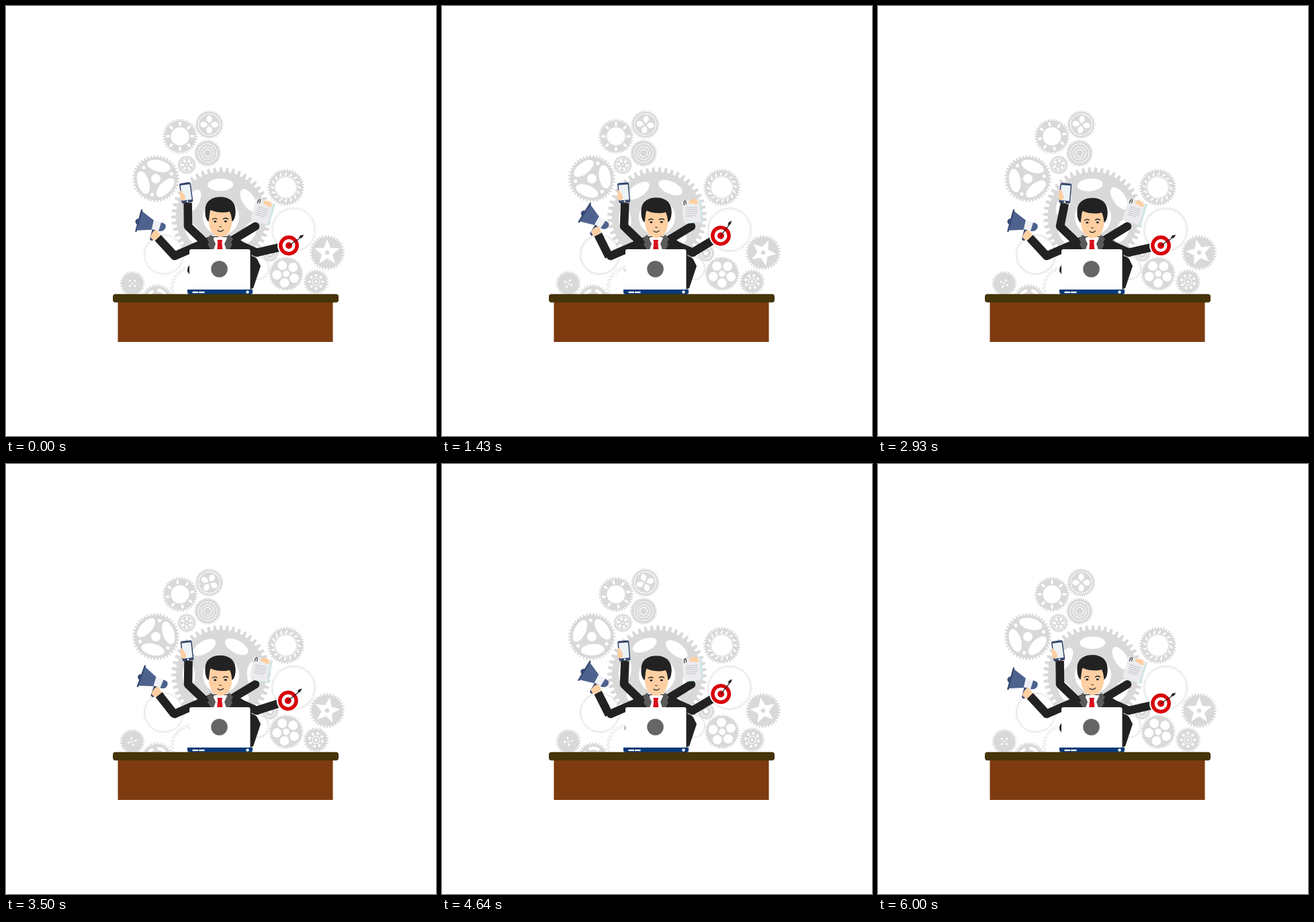
These frames come from a looping animation (640 px wide and 640 px high, 6070 ms). An HTML page:

```html
<!DOCTYPE html>
<html lang="en">
<head>
<meta charset="utf-8">
<title>Busy desk</title>
<style>
html, body { margin: 0; width: 100%; height: 100%; overflow: hidden; background: #fff; }
svg { display: block; width: 100%; height: 100%; }
.skin { fill: #fdcfa2; }
.suit { fill: #222; }
.sleeve { fill: none; stroke: #222; stroke-width: 12.5; }
.upper { stroke-linecap: round; }
.fine { fill: none; stroke: #222; stroke-linecap: round; }
</style>
</head>
<body>
<svg viewBox="0 0 640 640">
  <g id="gears"></g>

  <g id="typing"><path class="suit" d="M286 372 L276 382 Q269 389 270 395 L274 401 L290 400Z"/></g>
  <path class="suit" d="M283 356 Q290 348 303 343 L335 343 Q347 346 354 352 L366 372 Q371 373 374 377 L379 387 L368 420 L363 422 H280Z"/>

  <path class="sleeve upper" d="M290 355 L251 372"/>
  <path class="sleeve upper" d="M297 353 L271 328"/>
  <path class="sleeve upper" d="M338 348 L371 328"/>
  <path class="sleeve upper" d="M346 355 L373 367"/>

  <g id="horn">
    <path class="sleeve" d="M251 372 L226 345"/>
    <path fill="#34466c" d="M218 331 L224 333 L219 348 Q217 351 214 347Z"/>
    <circle cx="197" cy="321" r="4.5" fill="#384b74"/>
    <path fill="#4d628d" d="M202 305 L220 319 L217 333 L195 334Z"/>
    <path fill="#eef0f6" d="M220 319 L231 322 L227 335 L217 332Z"/>
    <path fill="#4d628d" d="M231 322 L236 324 Q239 327 237 331 Q235 336 227 335Z"/>
    <path d="M202 304 L193.5 335" stroke="#384b74" stroke-width="2.6" stroke-linecap="round"/>
    <path class="skin" d="M217 339 Q221 332 225 334 L230 341 L222 349 Q215 347 215 343Z"/>
  </g>

  <g id="phone">
    <path class="sleeve" d="M271 328 L270.5 293"/>
    <path class="skin" d="M264 286 L274 286 L276 293 L265 293Z"/>
    <g transform="translate(268 278) rotate(-8)">
      <rect x="-8.5" y="-15" width="17" height="30" rx="2.5" fill="#34466c"/>
      <rect x="-7" y="-12" width="14" height="23" fill="#edf2f5"/>
      <circle cy="13" r="1.3" fill="#fff"/>
      <path class="skin" d="M-9 -4 Q-6 -6 -5 -1 L-2 5 Q-2 12 -7 11 L-10 8Z"/>
    </g>
  </g>

  <g id="paper">
    <g transform="translate(382 306) rotate(17)">
      <path fill="#cfe5e3" d="M-10 -16 H15 V18 H-11Z"/>
      <path fill="#ececee" d="M-14 -16 H12 V17 H-11 L-14 14Z"/>
      <path d="M-9 -5 H8 M-9 -2 H8 M-9 1 H8 M-9 4 H8 M-9 7 H5" stroke="#c2c5c9"/>
      <path class="fine" stroke-width="1.1" d="M-11 -10 V-14 Q-9 -18 -8 -14 V-11"/>
      <path class="skin" d="M-4 -14 Q0 -19 8 -17 L11 -11 Q6 -8 3 -11 L-3 -12Z"/>
    </g>
  </g>

  <g id="target">
    <path class="sleeve" d="M373 367 L406 359.5"/>
    <circle cx="421" cy="356.5" r="17" fill="#fff"/>
    <circle cx="421" cy="356.5" r="14.9" fill="#d90008"/>
    <circle cx="421" cy="356.5" r="9.5" fill="#fff"/>
    <circle cx="421" cy="356.5" r="5" fill="#d90008"/>
    <path class="fine" stroke-width="1.2" d="M421 356.5 L439 344.5"/>
    <path class="suit" d="M436 345 L438 341.5 L443.5 340.5 L440.5 345Z"/>
  </g>

  <path fill="#fff" d="M309 344 L329 344 L331 364 H306Z"/>
  <path fill="#d90f1c" d="M314.5 348 H322 L321.3 352 L322.5 364 H314 L315.2 352Z"/>
  <path fill="#5a5a5a" d="M304 341 L299 347 L302 352 L300 355 L306 364 L309 363 L312 354 L306 341Z M333 341 L338 347 L335 352 L337 355 L332 364 L328 363 L325 354 L331 341Z"/>

  <g id="head">
    <path class="skin" d="M301.5 313 C301 334 309 344 319.3 344 C330 344 337.5 333 336.5 313 L333 302 H305Z"/>
    <path class="suit" d="M301.5 321 C297.5 318 296 311 296.5 303 C297 290 307 284.3 319 284.3 C333 284.3 342 292 341.7 306 C341.5 313 340 319 336.3 321 C336 315 335 310 333 306 C325 308.5 313 307.5 304.5 303.5 C302.5 309 303 314 301.5 321Z"/>
    <path class="fine" stroke-width="1.4" d="M307.5 317.5 Q310.5 315 314 317 M323.5 317 Q327 314.5 330.5 317"/>
    <ellipse class="suit" cx="311.3" cy="320.8" rx="2" ry="1.5"/>
    <ellipse class="suit" cx="326.8" cy="320.6" rx="2" ry="1.5"/>
    <path class="fine" stroke-width="1" d="M317.5 328.5 Q319 329.8 320.5 328.5"/>
    <path class="fine" stroke-width="1.2" d="M315 334 Q319 337.5 323.5 333.5"/>
  </g>

  <rect x="273" y="362" width="90.5" height="61" rx="3" fill="#fff"/>
  <circle cx="317.5" cy="391.5" r="12.3" fill="#666"/>
  <path fill="#083a78" d="M270 422 H367 V426 Q367 429 364 429 H273 Q270 429 270 426Z"/>
  <path fill="#fff" d="M277.5 425 H286 V427.3 H277.5Z M287 425 H295.5 V427.3 H287Z"/>
  <circle cx="359.5" cy="425.8" r="2.2" fill="#fff"/>

  <rect x="166.5" y="440" width="320" height="60" fill="#7d3b0f"/>
  <rect x="159" y="428.7" width="336" height="12.5" rx="4" fill="#46340b"/>
</svg>
<script>
const LOOP = 6070, FPS = 14, LAST = 84;
const GREY = '#d9d9d9';
const byId = id => document.getElementById(id);

// Closed outline with n trapezoid teeth between radii r (root) and R (tip).
function teeth(n, R, r) {
  const pts = [];
  for (let i = 0; i < n; i++) {
    for (const [f, rad] of [[-.32, r], [-.17, R], [.17, R], [.32, r]]) {
      const a = (i + f) * 2 * Math.PI / n;
      pts.push((rad * Math.cos(a)).toFixed(2) + ' ' + (rad * Math.sin(a)).toFixed(2));
    }
  }
  return 'M' + pts.join('L') + 'Z';
}

// Repeat a part n times around the hub, starting at angle a.
const around = (n, a, part) => Array.from({ length: n },
  (_, i) => `<g transform="rotate(${a + i * 360 / n})">${part}</g>`).join('');
const hole = (x, rx, ry = rx) => `<ellipse cx="${x}" rx="${rx}" ry="${ry}"/>`;
const hub = r => `<circle r="${r}"/>`;
const slot = (x, len, w) => `<rect x="${x}" y="${-w / 2}" width="${len}" height="${w}" rx="1"/>`;
const ring = (r, w, dash = '') =>
  `<circle r="${r}" fill="none" stroke="#fff" stroke-width="${w}" stroke-dasharray="${dash}"/>`;

const star = 'M' + Array.from({ length: 10 }, (_, i) => {
  const a = (i * 36 - 90) * Math.PI / 180, r = i % 2 ? 8.5 : 20;
  return (r * Math.cos(a)).toFixed(1) + ' ' + (r * Math.sin(a)).toFixed(1);
}).join('L') + 'Z';

// x, y, tip radius, root radius, teeth, degrees per second, cut-outs (none = outline only)
const gears = [
  [428, 333, 33, 30.6, 48, -132, ''],
  [235, 370, 30, 27.8, 44, 144, ''],
  [278, 420, 33, 29, 32, -135, ''],
  [374, 390, 18, 16, 30, 240, ''],
  [320, 314, 74, 67, 48, 60, around(6, -91, hole(48, 9.3, 19)) + hub(27)],
  [223, 257, 35, 32, 42, -120, around(3, -77, hole(19.5, 8.5, 17.5)) + around(3, -17, hole(24.5, 2.6)) + hub(7)],
  [259, 194, 26, 23.3, 36, -157.5, around(8, -90, slot(15.5, 6, 3.4)) + hub(13.5)],
  [302.5, 176.5, 21, 18.8, 38, -120, ring(16, 1.2) + around(4, -90, hole(8.2, 5, 4.2) + slot(2, 4, 2))],
  [300, 219, 20, 17.8, 38, -225, ring(14, 1.5, '2.4 1.27') + ring(9.6, 1.6, '2 1.02') + ring(5.6, 1.1)],
  [269, 236.5, 14, 12.5, 30, 300, ring(10, 1) + around(6, 0, hole(6.2, 2.4, 2)) + hub(1.2)],
  [416.5, 270, 27.5, 24.8, 38, -160,
    around(16, 0, '<g transform="translate(20 0) rotate(35)">' + slot(-2.7, 5.4, 2.4) + '</g>') + hub(15.5) + ring(16.8, .6)],
  [393, 368, 13, 11, 22, -300, ring(8, 1.2) + hub(3)],
  [478, 367, 26, 23, 34, 168, `<path d="${star}"/><circle r="3.2" fill="${GREY}"/>`],
  [417, 398.5, 25.5, 23.3, 38, 144, around(5, -115, hole(13.9, 6.9)) + hub(4.8)],
  [461.5, 410.5, 18.5, 15.8, 26, -240, around(8, 0, hole(9.7, 2)) + ring(5.5, 1) + hub(1.8)],
  [188, 413, 18.5, 15.8, 28, 240, around(4, 45, hole(5.2, 1.8, 1.4)) + hub(1.3)],
  [225, 437, 23, 20, 30, -180, ring(14, 4.5, '15.6 6.4') + hub(5)]
];

byId('gears').innerHTML = gears.map(([x, y, R, r, n, , cuts]) => {
  const paint = cuts ? `fill="${GREY}"` : 'fill="#fff" stroke="#dedede" stroke-width=".9"';
  return `<g transform="translate(${x} ${y})"><g><path d="${teeth(n, R, r)}" ${paint}/><g fill="#fff">${cuts}</g></g></g>`;
}).join('');
const wheels = [...byId('gears').children].map(g => g.firstChild);

// Forearms: pivot x, y, swing in degrees, period and lag in seconds
const arms = {
  horn: [246, 364, 16.5, 3, -.03],
  phone: [270.5, 328, 13.5, 1.2, .04],
  paper: [375, 331, -22, 3, -.03],
  target: [373, 368, -18.5, 3, -.03]
};

// Smooth 0 -> 1 -> 0 over one period.
const wave = (s, period) => (1 - Math.cos(2 * Math.PI * s / period)) / 2;
const move = (el, value) => el.setAttribute('transform', value);

function draw(s) {
  wheels.forEach((w, i) => move(w, `rotate(${gears[i][5] * s})`));
  for (const id in arms) {
    const [x, y, deg, period, lag] = arms[id];
    move(byId(id), `rotate(${deg * wave(s - lag, period)} ${x} ${y})`);
  }
  move(byId('head'), `translate(0 ${1.5 * wave(s, 2)})`);
  move(byId('typing'), `translate(${2.8 * wave(s, 1)} 0)`);
}

const start = performance.now();
function tick() {
  const t = (performance.now() - start) % LOOP;
  draw(Math.min(LAST, Math.floor((t + 5) * FPS / 1000)) / FPS);
  requestAnimationFrame(tick);
}
tick();
</script>
</body>
</html>
```
